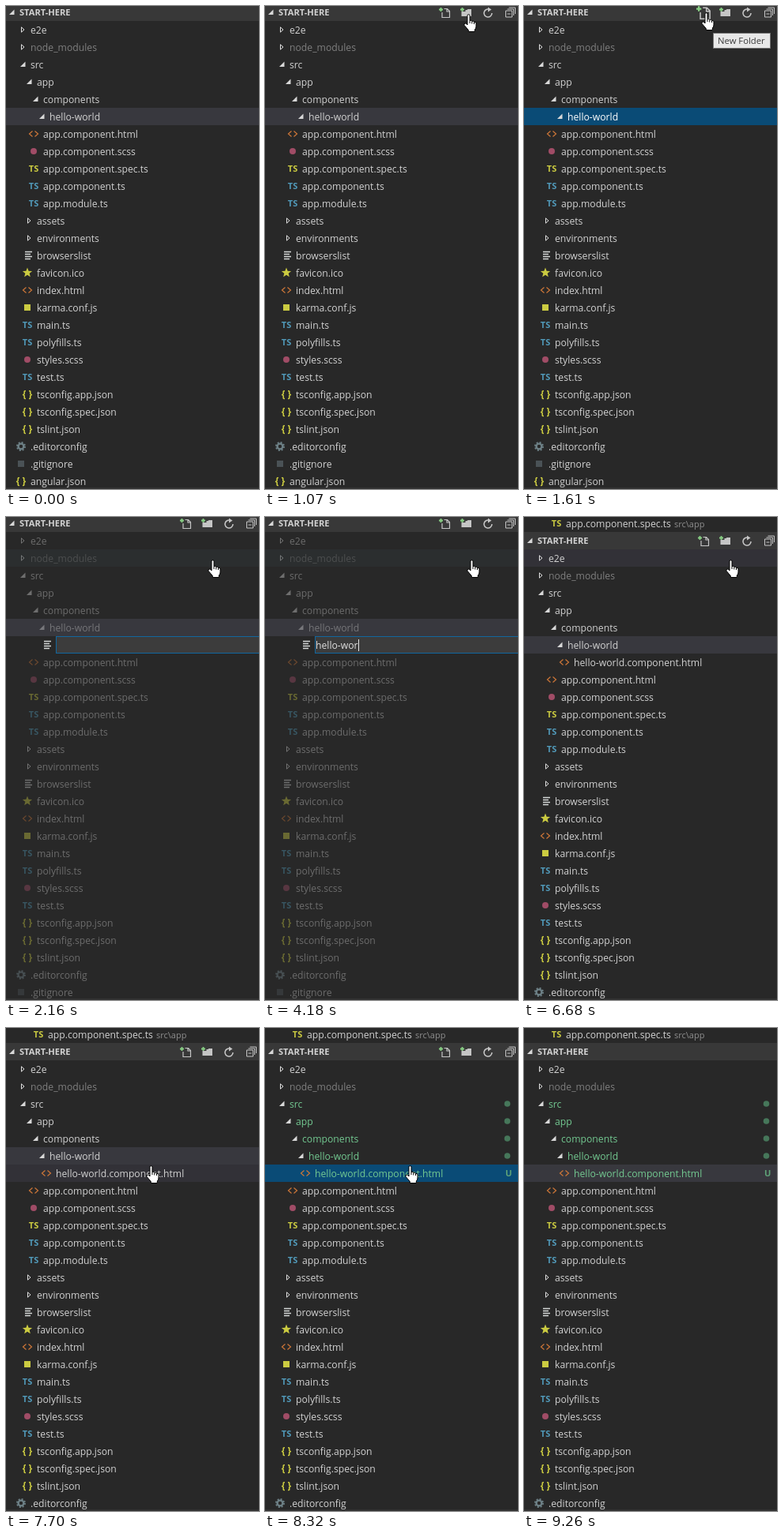
Write an HTML page with a canvas that moves like this. It is 320 px wide and 612 px high and loops after 9.33 s.

```html
<!DOCTYPE html>
<html lang="en">
<head>
<meta charset="utf-8">
<style>
html, body { margin: 0; width: 100%; height: 100%; overflow: hidden; background: #282828; }
canvas { display: block; width: 320px; height: 612px; }
</style>
</head>
<body>
<canvas></canvas>
<script>
const canvas = document.querySelector('canvas');
const g = canvas.getContext('2d');
const ratio = window.devicePixelRatio || 1;
canvas.width = 320 * ratio;
canvas.height = 612 * ratio;

const LOOP = 9330, ROW = 22, TEXT = '#d2d2d2', GREEN = '#73c991';
const FAMILY = '"Open Sans", "Noto Sans", sans-serif';
const FONT = '12.2px ' + FAMILY;
const SMALL = '11px ' + FAMILY;
const BOLD = 'bold 11.1px ' + FAMILY;
const NEW_FILE = 'hello-world.component.html';

// depth, kind, label
const tree = `0 shut e2e
0 shut node_modules
0 open src
1 open app
2 open components
3 open hello-world
2 html app.component.html
2 scss app.component.scss
2 spec app.component.spec.ts
2 ts app.component.ts
2 ts app.module.ts
1 shut assets
1 shut environments
1 list browserslist
1 star favicon.ico
1 html index.html
1 karma karma.conf.js
1 ts main.ts
1 ts polyfills.ts
1 scss styles.scss
1 ts test.ts
1 json tsconfig.app.json
1 json tsconfig.spec.json
1 json tslint.json
0 gear .editorconfig
0 git .gitignore
0 json angular.json`.split('\n').map(line => {
  const [depth, kind, label] = line.split(' ');
  return { depth: +depth, kind, label };
});
const parents = ['src', 'app', 'components', 'hello-world'];

// when each character of the new name is typed
const keys = [2620, 2780, 2940, 3090, 3240, 3470, 3700, 3930, 4180, 4250, 4420, 4570, 4650,
  4800, 4880, 5110, 5280, 5350, 5520, 5600, 5670, 5820, 6050, 6130, 6200, 6280];

// time, left, top of the pointer
const path = [[460, 294, 14], [690, 264, 14], [840, 264, 14], [1070, 251, 10], [1300, 251, 10],
  [1530, 224, 8], [1700, 224, 8], [2080, 255, 54], [7230, 255, 54], [7700, 177, 174],
  [8630, 177, 174], [9010, 325, 150]];

const hand = new Path2D('M5 14V2.2Q5 .7 6.5 .7T8 2.2V8.5Q10.5 7.5 10.8 9.3Q13.3 8.6 13.5 10.4' +
  'Q16 9.8 16 12V16Q16 18.5 14.3 20V22.5H6.3V20.5L1 14.3Q.3 12.3 2.3 12Q3.5 12 5 14Z');
const fingers = new Path2D('M8 8.5V12M10.8 9.3V12.5M13.5 10.4V13');

function text(str, x, y, color = TEXT, font = FONT) {
  g.font = font;
  g.fillStyle = color;
  g.fillText(str, x, y);
}

function rect(x, y, w, h, color) {
  g.fillStyle = color;
  g.fillRect(x, y, w, h);
}

function stroke(d, color, width = 1) {
  g.strokeStyle = color;
  g.lineWidth = width;
  g.stroke(new Path2D(d));
}

function fill(d, color) {
  g.fillStyle = color;
  g.fill(new Path2D(d));
}

function dot(x, y, r, color) {
  g.beginPath();
  g.arc(x, y, r, 0, 7);
  g.fillStyle = color;
  g.fill();
}

function letters(str, color, size = 11) {
  g.textAlign = 'center';
  text(str, 0, 4, color, `bold ${size}px ${FAMILY}`);
  g.textAlign = 'left';
}

const icons = {
  open: () => fill('M4.5-3.5V3H-2Z', '#d8d8d8'),
  shut: () => stroke('M-.5-3.2V3.2L3-0Z', '#e0e0e0'),
  html: () => stroke('M-1.5-3.5L-5.5 0L-1.5 3.5M1.5-3.5L5.5 0L1.5 3.5', '#cc7638', 1.2),
  scss: () => dot(0, 0, 4, '#a04c66'),
  karma: () => rect(-4, -4, 8, 8, '#cbcb41'),
  git: () => rect(-4, -4, 8, 8, '#4a5256'),
  spec: () => letters('TS', '#cbcb41'),
  ts: () => letters('TS', '#519aba'),
  json: () => letters('{ }', '#cbcb41', 12),
  c: () => letters('C', '#519aba', 13),
  h: () => letters('C', '#a074c4', 13),
  list: () => stroke('M-3-4.5H6M-3-1.5H4M-3 1.5H6M-3 4.5H4', '#d4d7d6', 1.3),
  star() {
    g.beginPath();
    for (let i = 0; i < 10; i++) {
      const r = i % 2 ? 2.8 : 6.5, a = (i / 5 - .5) * Math.PI;
      g.lineTo(r * Math.cos(a), r * Math.sin(a));
    }
    g.fillStyle = '#cbcb41';
    g.fill();
  },
  gear() {
    g.strokeStyle = '#6d8086';
    for (const [r, width, dash] of [[3.4, 2.4, []], [5, 2, [Math.PI * .625]]]) {
      g.lineWidth = width;
      g.setLineDash(dash);
      g.beginPath();
      g.arc(0, 0, r, 0, 2 * Math.PI);
      g.stroke();
    }
    g.setLineDash([]);
  }
};

function at(x, y, draw, scale = 1) {
  g.save();
  g.translate(x, y);
  g.scale(scale, scale);
  draw();
  g.restore();
}

function pointer(t) {
  const i = path.findIndex(p => p[0] > t);
  if (i < 1) return null;
  const [t0, x0, y0] = path[i - 1], [t1, x1, y1] = path[i];
  const k = (t - t0) / (t1 - t0);
  return { x: x0 + (x1 - x0) * k, y: y0 + (y1 - y0) * k };
}

function toolbar(y, pressed) {
  const light = '#c5c5c5', plus = '#89d185';
  at(227.5, y, () => {
    stroke('M-1-4.5H3L6-1.5V6.5H-3.5V0M2.5-4.5V-1H6', light, 1.2);
    stroke('M-5-6V-1M-7.5-3.5H-2.5', plus, 1.8);
  }, pressed ? 1.272 : 1);
  at(254.5, y, () => {
    fill('M-6-1H-1V-3H1L2-4H6.5V5H-6Z', light);
    stroke('M-5-6V-1M-7.5-3.5H-2.5', plus, 1.8);
  });
  at(282, y + 1, () => {
    stroke('M1.5-4.7A5 5 0 1 0 5 0', light, 1.6);
    fill('M0-7.5L4.5-4.5L0-1.5Z', light);
  });
  at(309.5, y, () => {
    stroke('M-5-2H3V6H-5ZM-3 2H1M-3-4H5V4M-1-6H7V2', light, 1);
  });
}

function inputRow(y, t) {
  const name = NEW_FILE.slice(0, keys.filter(k => k <= t).length);
  const ext = name.split('.').pop();
  const known = { c: 'c', h: 'h', component: 'html', htm: 'html', html: 'html' };
  const kind = name.includes('.') && known[ext] || 'list';
  at(51, y + 11, icons[kind]);
  rect(63, y, 257, ROW, '#3c3c3c');
  g.strokeStyle = '#11679f';
  g.lineWidth = 1;
  g.strokeRect(63.5, y + .5, 260, ROW - 1);
  text(name, 64, y + 16, '#e0e0e0');
  if (t < 2160 || t >= 2540) {
    rect(Math.round(64 + g.measureText(name).width), y + 4, 1, 15, '#e8e8e8');
  }
}

function render(t) {
  const editing = t >= 1700 && t < 6530;
  const created = t >= 6530;
  const shift = t >= 6600 ? ROW : 0;
  const tracked = t >= 8320;
  const pressed = t >= 1530 && t < 1700;
  const hover = pointer(t);
  const chosen = t < 7850 ? 'hello-world' : NEW_FILE;
  const focused = pressed || t >= 7850 && t < 9260;
  const dim = editing ? 1 - .6 * Math.min(1, (t - 1700) / 200) : 1;

  g.setTransform(ratio, 0, 0, ratio, 0, 0);
  rect(0, 0, 320, 612, '#282828');

  const rows = tree.slice();
  if (created) rows.splice(6, 0, { depth: 4, kind: 'html', label: NEW_FILE });
  if (editing) rows.splice(6, 0, { kind: 'input' });

  rows.forEach(({ depth, kind, label }, i) => {
    const y = 19 + shift + i * ROW, x = 31 + depth * 8;
    if (kind === 'input') return inputRow(y, t);
    const selected = label === chosen;
    const folder = kind === 'open' || kind === 'shut';
    const inside = hover && hover.x < 320 && hover.y + 1 >= y && hover.y + 1 < y + ROW;
    if (selected) rect(0, y, 320, ROW, focused ? '#0a4b76' : '#38383e');
    else if (inside) rect(0, y, 320, ROW, created ? '#323137' : '#2b2e2f');

    g.globalAlpha = dim;
    at(x - (folder ? 11 : 12), y + 11, icons[kind]);
    let color = selected && focused ? '#ffffff' : label === 'node_modules' ? '#7f7f7f' : TEXT;
    if (tracked && (parents.includes(label) || label === NEW_FILE)) {
      color = GREEN;
      if (folder) dot(306.5, y + 11, 3.8, '#46775a');
      else text('U', 304, y + 15, '#5fa378', BOLD);
    }
    text(label, x, y + 16, color);
    g.globalAlpha = 1;
  });

  if (shift) {
    at(41, 8, icons.spec);
    text('app.component.spec.ts', 53, 13);
    text('src\\app', 190, 13, '#8f8f8f', SMALL);
  }
  rect(0, shift - 3, 320, ROW, '#383838');
  at(6, 8 + shift, icons.open);
  text('START-HERE', 17, 12 + shift, TEXT, BOLD);
  if (t >= 460 && t < 9010) toolbar(8 + shift, pressed);
  rect(0, 610, 320, 2, '#323232');

  if (t >= 1220 && t < 1700) {
    rect(239, 34, 73, 20, '#767676');
    rect(240, 35, 71, 18, '#e8e8e8');
    text('New Folder', 245, 48, '#3c3c3c', '11.3px ' + FAMILY);
  }
  if (hover) {
    at(hover.x, hover.y, () => {
      g.fillStyle = '#ffffff';
      g.fill(hand);
      g.strokeStyle = '#000000';
      g.lineWidth = 1;
      g.stroke(hand);
      g.stroke(fingers);
    });
  }
}

const start = performance.now();
function frame(now) {
  render(Math.max(0, now - start) % LOOP);
  requestAnimationFrame(frame);
}
requestAnimationFrame(frame);
</script>
</body>
</html>
```
